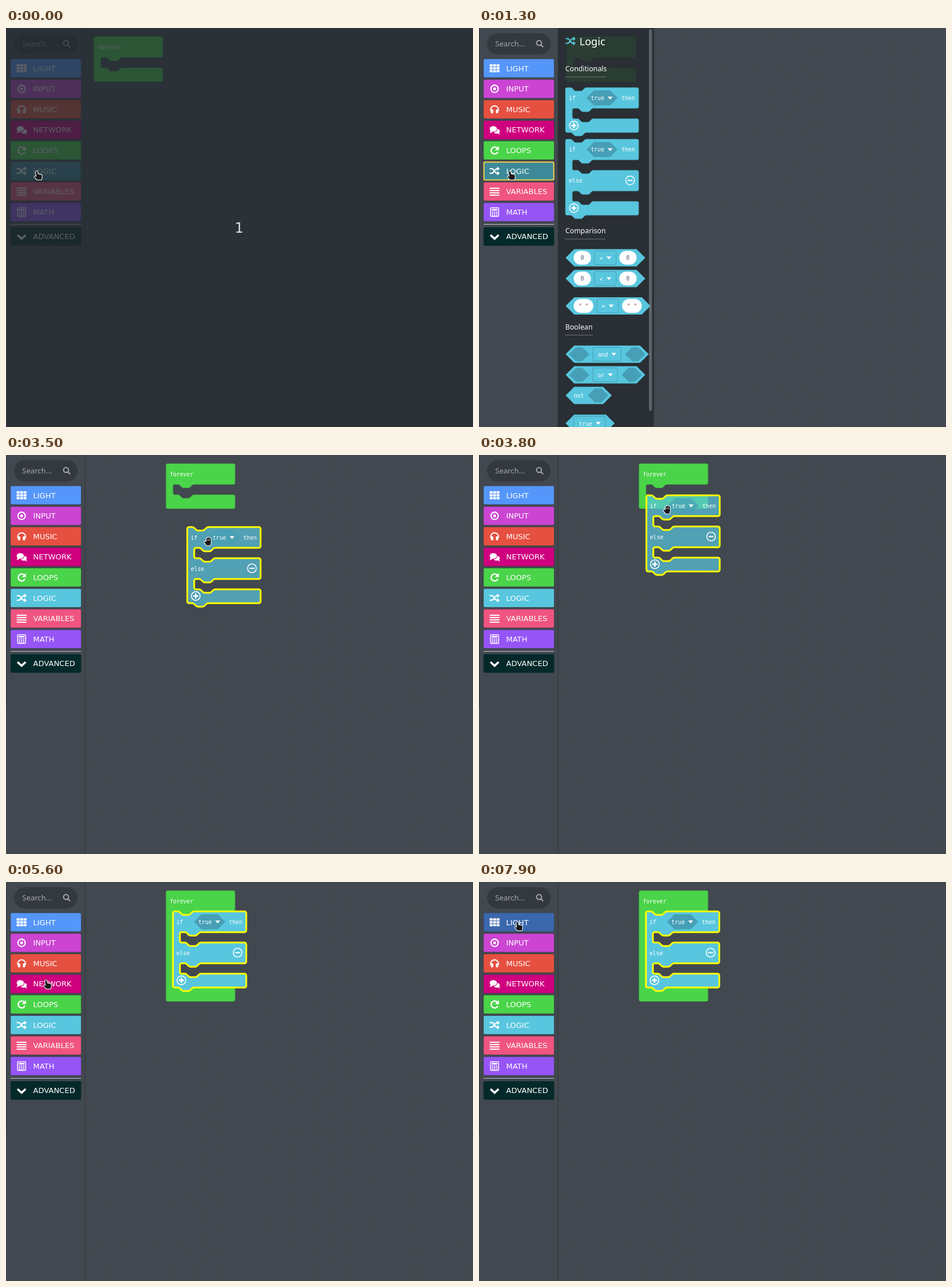
Write an HTML page with a canvas that moves like this. It is 809 by 692 pixels and loops after 8 s.

```html
<!DOCTYPE html>
<html lang="en">
<head>
<meta charset="utf-8">
<title>Block editor</title>
<style>
html, body { margin: 0; width: 100%; height: 100%; overflow: hidden; background: #42484f; }
canvas { display: block; }
</style>
</head>
<body>
<canvas width="809" height="692"></canvas>
<script>
const ctx = document.querySelector('canvas').getContext('2d');
const LOOP = 8000, STEP = 100;
const CYAN = '#58c6de', FIELD = '#469fb6', GREEN = '#4ad449', BACK = '#42484f', YELLOW = '#ffff00';
const SANS = '"DejaVu Sans", sans-serif', NOTO = '"Noto Sans", sans-serif';
const MONO = '9.7px "DejaVu Sans Mono", monospace';

// Pointer path: time, x, y
const pointerPath = [
  [0, 56, 256], [1600, 56, 256], [1800, 288, 394], [1900, 270, 302], [2000, 270, 302],
  [2400, 159, 235], [2600, 173, 218], [3100, 173, 218], [3200, 205, 208], [3500, 350, 150],
  [3800, 326, 95], [3900, 326, 95], [4100, 326, 47], [4200, 326, 67], [4300, 326, 67],
  [4400, 326, 80], [4800, 326, 80], [5100, 100, 180], [5200, 75, 150], [5500, 75, 150],
  [5600, 72, 178], [5700, 70, 108], [6000, 70, 108], [6300, 70, 181], [6400, 70, 145],
  [6500, 70, 145], [6600, 62, 214], [6700, 62, 214], [6800, 60, 287], [6900, 66, 160],
  [7000, 66, 160], [7300, 70, 110], [7600, 70, 110], [7900, 69, 77]
];
// Hovered toolbox row: from, to, row
const hovers = [
  [0, 1700, 5], [5200, 5600, 2], [5700, 6100, 1], [6200, 6600, 2],
  [6800, 6900, 5], [6900, 7100, 3], [7200, 7700, 1], [7800, LOOP, 0]
];

function at(x, y, draw) {
  ctx.save();
  ctx.translate(x, y);
  draw();
  ctx.restore();
}
function text(s, x, y, font, color = '#fff', align = 'left') {
  ctx.font = font;
  ctx.fillStyle = color;
  ctx.textAlign = align;
  ctx.fillText(s, x, y);
}
const label = (s, x, y, color, align) => text(s, x, y + 3.5, MONO, color, align);
function rect(x, y, w, h, color) {
  ctx.fillStyle = color;
  ctx.fillRect(x, y, w, h);
}
function roundRect(x, y, w, h, r, fill, stroke, width = 1) {
  ctx.beginPath();
  ctx.roundRect(x, y, w, h, r);
  if (fill) { ctx.fillStyle = fill; ctx.fill(); }
  if (stroke) { ctx.strokeStyle = stroke; ctx.lineWidth = width; ctx.stroke(); }
}
function fillPath(d, color) {
  ctx.fillStyle = color;
  ctx.fill(new Path2D(d));
}
function strokePath(d, color, width) {
  ctx.strokeStyle = color;
  ctx.lineWidth = width;
  ctx.stroke(new Path2D(d));
}
function oval(x, y, rx, ry, fill) {
  ctx.beginPath();
  ctx.ellipse(x, y, rx, ry, 0, 0, 7);
  ctx.fillStyle = fill;
  ctx.fill();
}
const hexagon = (x1, x2, y, h, color) =>
  fillPath(`M${x1} ${y}l${h} ${-h}H${x2 - h}L${x2} ${y}l${-h} ${h}H${x1 + h}Z`, color);
const caret = (x, y) => fillPath(`M${x - 4.3} ${y - 2.3}h8.6l-4.3 5z`, '#fff');

// Block outlines
const notch = d => `c${1.5 * d} 0 ${2.2 * d} .8 ${3 * d} 1.5l${3 * d} 3c${.8 * d} .7 ${1.5 * d} 1.5 ${3 * d} 1.5` +
  `h${9 * d}c${1.5 * d} 0 ${2.2 * d} -.8 ${3 * d} -1.5l${3 * d} -3c${.8 * d} -.7 ${1.5 * d} -1.5 ${3 * d} -1.5`;
function blockShape(width, slots, stackable) {
  const turn = 'a3 3 0 0 1 3 3', end = 'a3 3 0 0 1 -3 3';
  let y = 0, d = `M0 3a3 3 0 0 1 3 -3${stackable ? 'h6' + notch(1) : ''}H${width - 3}${turn}`;
  for (const slot of slots) {
    y += 36;
    d += `V${y - 3}${end}H48${notch(-1)}H15a3 3 0 0 0 -3 3V${y + slot - 3}a3 3 0 0 0 3 3h6${notch(1)}H${width - 3}${turn}`;
    y += slot;
  }
  y += 24;
  return new Path2D(`${d}V${y - 3}${end}${stackable ? 'H36' + notch(-1) : ''}H3a3 3 0 0 1 -3 -3Z`);
}
const ifShape = blockShape(127, [18], true);
const ifElseShape = blockShape(127, [18, 18], true);
const foreverShape = blockShape(119.5, [18], false);
const foreverFullShape = blockShape(119.5, [132], false);

function roundButton(x, y, plus) {
  ctx.beginPath();
  ctx.arc(x, y, 7.6, 0, 7);
  ctx.strokeStyle = '#fff';
  ctx.lineWidth = 1.5;
  ctx.stroke();
  strokePath(`M${x - 4.5} ${y}h9` + (plus ? `M${x} ${y - 4.5}v9` : ''), '#fff', plus ? 2.6 : 2);
}
function ifBlock(x, y, hasElse, { outline, alpha = 1 } = {}) {
  const shape = hasElse ? ifElseShape : ifShape;
  at(x, y, () => {
    ctx.globalAlpha = alpha;
    ctx.fillStyle = CYAN;
    ctx.fill(shape);
    hexagon(36.5, 90.5, 18, 13, FIELD);
    ctx.globalAlpha = 1;
    ctx.strokeStyle = outline ? YELLOW : FIELD;
    ctx.lineWidth = outline ? 3 : .6;
    ctx.stroke(shape);
    label('if', 6, 18);
    label('true', 44, 18);
    caret(77.5, 18);
    label('then', 97, 18);
    if (hasElse) {
      label('else', 6, 72);
      roundButton(112, 71.5, false);
    }
    roundButton(14.7, hasElse ? 119.5 : 65.8, true);
  });
}
function foreverBlock(x, full) {
  at(x, 15, () => {
    const shape = full ? foreverFullShape : foreverShape;
    ctx.fillStyle = GREEN;
    ctx.fill(shape);
    ctx.strokeStyle = '#3fb645';
    ctx.lineWidth = .6;
    ctx.stroke(shape);
    label('forever', 6.5, 18.5);
  });
}

// Toolbox
const shuffle = color => {
  strokePath('M-8.5 -4h3.5c4 0 5 8 9.5 8h2M-8.5 4h3.5c4 0 5 -8 9.5 -8h2', color, 2.2);
  fillPath('M4.5 -7.8l4.5 3.8l-4.5 3.8zM4.5 .2l4.5 3.8l-4.5 3.8z', color);
};
const icons = {
  LIGHT() {
    for (let i = 0; i < 9; i++) rect(-8.5 + i % 3 * 6, -7 + (i / 3 | 0) * 5, 5, 4, '#fff');
  },
  INPUT() {
    strokePath('M6.3 0a6.3 6.3 0 1 1 -12.6 0a6.3 6.3 0 1 1 12.6 0', '#fff', 2.1);
    oval(0, 0, 2.5, 2.5, '#fff');
  },
  MUSIC() {
    strokePath('M-6.8 3v-2.5a6.8 6.5 0 0 1 13.6 0v2.5', '#fff', 1.9);
    roundRect(-6.3, 0, 4, 7, 1.5, '#fff');
    roundRect(2.3, 0, 4, 7, 1.5, '#fff');
  },
  NETWORK() {
    oval(3.5, 2.3, 5.5, 4.2, '#fff');
    fillPath('M5 5l4 3.5l-1 -5z', '#fff');
    oval(-2.2, -1.5, 7.2, 5.7, '#cf007f');
    oval(-2.2, -1.7, 6.3, 4.8, '#fff');
    fillPath('M-7 1l-1.5 4.5l5.5 -2z', '#fff');
  },
  LOOPS() {
    strokePath('M4.5 -4a6 6 0 1 0 1.2 6.3', '#fff', 2.3);
    fillPath('M7.5 -7.5v7h-7z', '#fff');
  },
  LOGIC: () => shuffle('#fff'),
  VARIABLES() {
    for (let i = 0; i < 4; i++) rect(-8.5, -6.7 + i * 4, 17, 2, '#fff');
  },
  MATH() {
    roundRect(-7, -7.5, 14, 15, 1, null, '#fff', 1.5);
    rect(-5, -5.3, 10, 2.6, '#fff');
    for (let i = 0; i < 9; i++) rect(-4.8 + i % 3 * 3.6, -1 + (i / 3 | 0) * 2.8, 2.3, 1.8, '#fff');
  },
  ADVANCED: () => strokePath('M-7 -2.5l7 6.5l7 -6.5', '#fff', 3.6)
};
const rowColors = ['#5596fa', '#cb45d2', '#e65040', '#cf007f', GREEN, CYAN, '#f05480', '#9655f7', '#04292a'];

function toolbox(hovered, logicOpen) {
  rect(0, 0, 137, 692, BACK);
  rect(0, 0, 1, 437, '#2c3238');
  rect(136.5, 0, 1, 692, '#30363c');
  roundRect(14, 9, 110, 37, 18.5, '#33393f');
  text('Search...', 28, 32, '13px ' + NOTO, '#a3a7ab');
  strokePath('M108.3 26a4.3 4.3 0 1 1 -8.6 0a4.3 4.3 0 1 1 8.6 0M107 29l4.2 4.2', '#a3a7ab', 2);
  Object.keys(icons).forEach((name, i) => {
    const y = i < 8 ? 69.8 + i * 35.63 : 361.5;
    roundRect(8, y - 16, 122, 32, 2, rowColors[i], i === 8 ? '#1c3438' : 'rgba(0,0,0,.12)');
    if (i === hovered) roundRect(8, y - 16, 122, 32, 2, 'rgba(0,0,0,.31)');
    if (i === 5 && logicOpen) roundRect(8.5, y - 15.5, 121, 31, 2, null, '#f2d24b', 2);
    at(27, y, icons[name]);
    text(name, 47, y + 4.7, '13px ' + SANS);
  });
  rect(8, 340, 122, 1, '#c8cacc');
}

// Flyout
function heading(s, y) {
  text(s, 149.5, y + 4.5, '12.24px ' + NOTO);
  ctx.setLineDash([1, 1]);
  strokePath(`M149.5 ${y + 14.5}h${ctx.measureText(s).width}`, '#b5b9bc', 1);
  ctx.setLineDash([]);
}
function dropdown(x, w, y, s) {
  roundRect(x, y - 12, w, 24, 3, null, FIELD, 1);
  label(s, x + (w - 14) / 2, y + .5, '#fff', 'center');
  caret(x + w - 12.5, y);
}
function compare(y, right, sign, value, rx) {
  hexagon(150, right, y, 15, CYAN);
  for (const x of [164 + rx, right - 15 - rx]) {
    roundRect(x - rx, y - 12, rx * 2, 24, 12, '#fff');
    label(value, x, y, value === '0' ? '#575e75' : '#a04545', 'center');
  }
  dropdown(170 + rx * 2, 37.5, y, sign);
}
function combine(y, right, word, w) {
  hexagon(150, right, y, 15, CYAN);
  hexagon(156, 191, y, 12, FIELD);
  hexagon(right - 41, right - 6, y, 12, FIELD);
  dropdown(197, w, y, word);
}
function flyout(outlined) {
  rect(137, 0, 166, 692, 'rgba(39,45,49,.9)');
  roundRect(294.5, 2, 5, 662, 2.5, '#5f676e');
  at(158.5, 22.5, () => shuffle(CYAN));
  text('Logic', 174, 29.5, '18px ' + NOTO);
  heading('Conditionals', 70.5);
  ifBlock(149.7, 103.3, false);
  ifBlock(149.7, 192.8, true, { outline: outlined });
  heading('Comparison', 351.5);
  compare(398.5, 288, '=', '0', 15);
  compare(434.5, 288, '<', '0', 15);
  compare(482, 297, '=', '" "', 17);
  heading('Boolean', 518);
  combine(565.8, 294, 'and', 49);
  combine(601.5, 288, 'or', 43);
  hexagon(150, 230, 637.3, 15, CYAN);
  label('not', 164, 637.8);
  hexagon(188.5, 224, 637.3, 12, FIELD);
  hexagon(150, 235, 685.5, 15, CYAN);
  dropdown(164, 55, 685.5, 'true');
}

function grid(offset) {
  ctx.fillStyle = '#555c63';
  for (let x = 137 + offset; x < 809; x += 15)
    for (let y = 11; y < 692; y += 15) ctx.fillRect(x, y, 1, 1);
}

function pointer(x, y, kind) {
  const shapes = {
    point: 'M-3.5 -7.5q1.8 -1 2.2 1l.6 4l5.2 1q2.2 .6 1.8 3l-1 5.5h-7.5l-4 -4.5q-.8 -2 1.5 -1.5l1.6 1l-1.4 -8.2z',
    grab: 'M-3 -4q0 -2 1.7 -1.6q.3 -2 2 -1.2q1.4 -.8 2 1q2.1 -.6 2.3 1.6v6l-1.3 5h-6l-4 -5.5q-.6 -1.8 1.4 -1.6l1.9 1z'
  };
  at(x, y, () => {
    ctx.lineJoin = 'round';
    strokePath(shapes[kind], '#fff', 2);
    fillPath(shapes[kind], '#17191b');
    if (kind === 'grab') strokePath('M-1.2 -4v3M.9 -5v4M3 -4v3', '#fff', .7);
  });
}
function pointerAt(t) {
  const i = pointerPath.findIndex(key => key[0] > t);
  if (i < 0) return pointerPath.at(-1).slice(1);
  const [t0, x0, y0] = pointerPath[i - 1], [t1, x1, y1] = pointerPath[i];
  const k = (t - t0) / (t1 - t0);
  return [x0 + (x1 - x0) * k, y0 + (y1 - y0) * k];
}

function draw(t) {
  const flyoutOpen = t >= 1200 && t < 3200;
  const scrolled = t >= 3200, dragging = scrolled && t < 4600, nested = t >= 4000;
  const [px, py] = pointerAt(t);
  const hover = hovers.find(([from, to]) => t >= from && t < to);

  rect(0, 0, 809, 692, BACK);
  grid(scrolled ? 13 : 8);
  foreverBlock(scrolled ? 277.2 : 152.2, nested);
  toolbox(hover ? hover[2] : -1, flyoutOpen);
  if (flyoutOpen) flyout(t >= 1900);
  if (dragging) {
    if (nested) at(289.2, 51, () => {
      ctx.fillStyle = '#8a8c90';
      ctx.fill(ifElseShape);
      ctx.strokeStyle = '#8a8c90';
      ctx.lineWidth = 2;
      ctx.stroke(ifElseShape);
    });
    ifBlock(px - 36, py - 25, true, { outline: true, alpha: .7 });
  } else if (scrolled) {
    ifBlock(289.2, 51, true, { outline: true });
  }
  if (t < 200) {
    rect(1, 0, 808, 692, 'rgba(35,41,48,.74)');
    text('1', 404, 355, '24px ' + SANS, '#dfe0e1', 'center');
  }
  pointer(px, py, px < 137 ? 'point' : 'grab');
}

function frame(now) {
  draw(Math.floor(now % LOOP / STEP) * STEP);
  requestAnimationFrame(frame);
}
requestAnimationFrame(frame);
</script>
</body>
</html>
```
